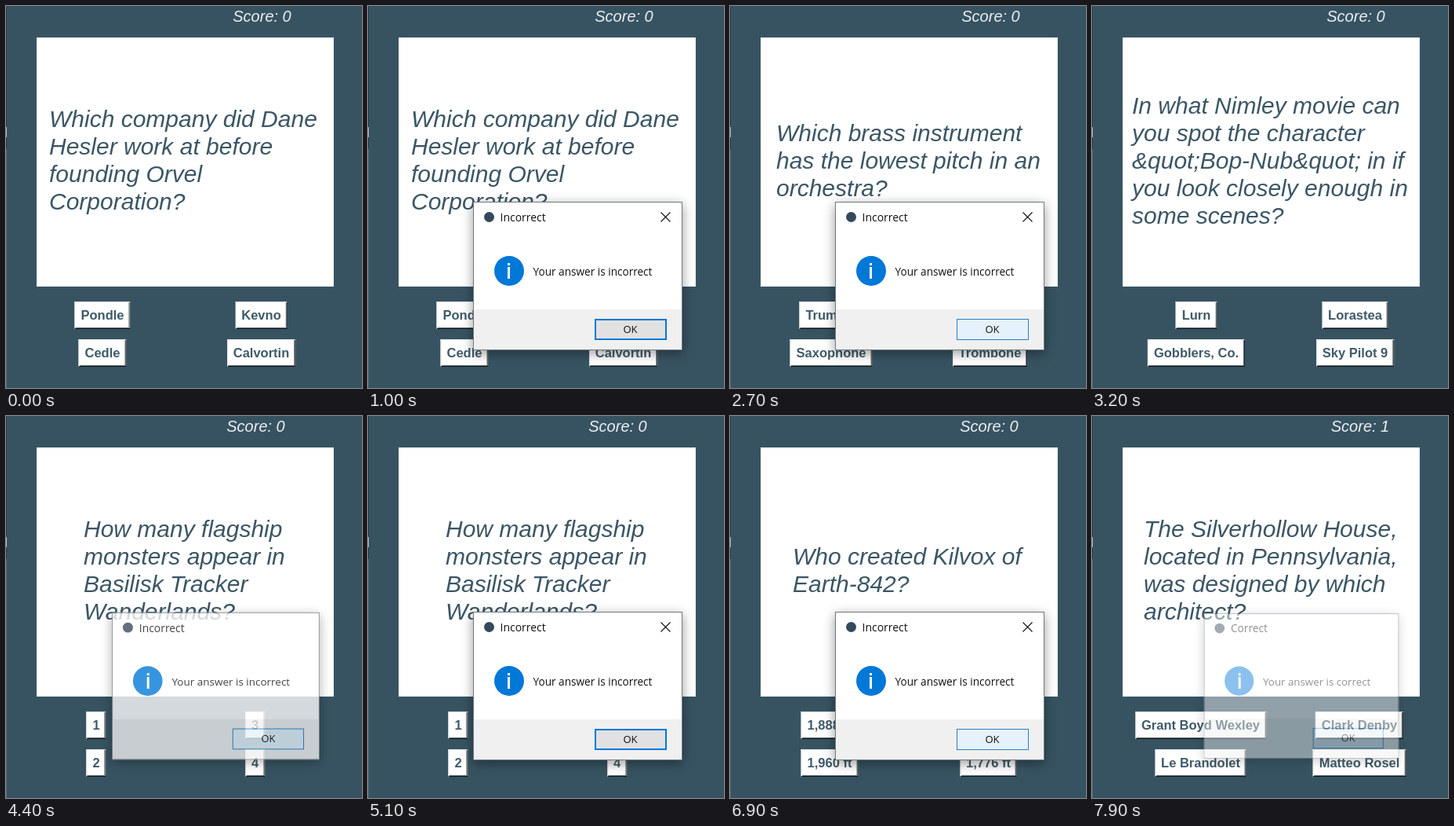
Recreate the animation shown at these times as an HTML page. Size 454 px wide and 486 px high, loop 8000 ms.

```html
<!DOCTYPE html>
<html lang="en">
<head>
<meta charset="utf-8">
<title>Quiz</title>
<style>
html, body { margin: 0; width: 100%; height: 100%; overflow: hidden; background: #375362; }
body { position: relative; font-family: "Liberation Sans", Arial, sans-serif; }
div { position: absolute; box-sizing: border-box; white-space: pre; }
#edge { left: 0; top: 0; width: 1px; height: 100%;
  background: linear-gradient(#2b3942 154px, #b9c2c8 0 167px, #2b3942 0 182px, #566a76 0); }
#score { top: 1px; color: #eceff1; font: italic 20px/24px "Liberation Sans", Arial, sans-serif; transform: translateX(-50%); }
#card { left: 39px; top: 40px; width: 379px; height: 317px; background: #fff; border: 1px solid #f1f3f5; }
#question { top: 195.5px; color: #3b5665; font: italic 30px/35px "Liberation Sans", Arial, sans-serif; transform: translateY(-50%); }
.answer { height: 35px; padding: 0 7px; background: #fff; color: #3f5a69; font-size: 16.5px; font-weight: bold; line-height: 33px;
  border: 1px solid; border-color: #eee #11171a #11171a #eee; box-shadow: inset -1px -1px #5f686d; transform: translateX(-50%); }
#dialog { top: 249px; height: 189px; background: #fff; border: 1px solid #707a80; color: #111;
  font-family: "Open Sans", "Noto Sans", sans-serif; box-shadow: 0 4px 14px rgba(0,0,0,.4); }
#icon { left: 13px; top: 12px; width: 13px; height: 13px; border-radius: 50%; background: #34495c; }
#title { left: 34px; top: 8px; font-size: 14px; line-height: 22px; }
#close { position: absolute; right: 14px; top: 12px; }
#info { left: 26px; top: 68px; width: 38px; height: 38px; border-radius: 50%; background: #0078d7; }
#info::before, #info::after { content: ""; position: absolute; left: 17.5px; width: 3px; background: #fff; }
#info::before { top: 9px; height: 3px; }
#info::after { top: 14px; height: 15px; }
#message { left: 76px; top: 78px; font-size: 13.6px; line-height: 20px; }
#footer { left: 0; right: 0; bottom: 0; height: 51px; background: #f0f0f0; }
#ok { right: 19px; bottom: 12px; width: 92px; height: 27px; border: 2px solid #0078d7; background: #e1e1e1;
  font-size: 13px; line-height: 23px; text-align: center; }
#ok.hover { border-width: 1px; border-color: #2a7fc4; background: #e5f1fb; line-height: 25px; }
</style>
</head>
<body>
<div id="edge"></div>
<div id="score"></div>
<div id="card"></div>
<div id="question"></div>
<div class="answer"></div><div class="answer"></div><div class="answer"></div><div class="answer"></div>
<div id="dialog">
  <div id="icon"></div><div id="title"></div>
  <svg id="close" width="13" height="13" stroke="#111" stroke-width="1.1"><path d="M.5 .5l12 12M12.5 .5l-12 12"/></svg>
  <div id="info"></div><div id="message"></div>
  <div id="footer"></div><div id="ok">OK</div>
</div>
<script>
const LOOP = 8000, STEP = 100, FADE = 200, COLUMN_GAP = 202.5;

// x: left of the question, col: centre of the right column, answers: two rows of two
const quiz = [
  { x: 55, col: 325.5, text: "Which company did Dane\nHesler work at before\nfounding Orvel\nCorporation?",
    answers: ["Pondle", "Kevno", "Cedle", "Calvortin"] },
  { x: 59, col: 331.5, text: "Which brass instrument\nhas the lowest pitch in an\norchestra?",
    answers: ["Trumpet", "Tuba", "Saxophone", "Trombone"] },
  { x: 51, col: 335.5, text: "In what Nimley movie can\nyou spot the character\n&quot;Bop-Nub&quot; in if\nyou look closely enough in\nsome scenes?",
    answers: ["Lurn", "Lorastea", "Gobblers, Co.", "Sky Pilot 9"] },
  { x: 99, col: 317.5, text: "How many flagship\nmonsters appear in\nBasilisk Tracker\nWanderlands?",
    answers: ["1", "3", "2", "4"] },
  { x: 80, col: 329.5, text: "What is the height of\nthe Alder Spire Tower?",
    answers: ["1,888 ft", "2,002 ft", "1,960 ft", "1,776 ft"] },
  { x: 80, col: 334, text: "Who created Kilvox of\nEarth-842?",
    answers: ["Ivo Tessel", "Hal Morven", "Lena Corvik", "Odo Brask"] },
  { x: 66, col: 341, text: "The Silverhollow House,\nlocated in Pennsylvania,\nwas designed by which\narchitect?",
    answers: ["Grant Boyd Wexley", "Clark Denby", "Le Brandolet", "Matteo Rosel"] }
];

// One dialog follows each question
const dialogs = [
  { open: 700, close: 1550 },
  { open: 2150, close: 2750 },
  { open: 3550, close: 4356 },
  { open: 4800, close: 5450 },
  { open: 6350, close: 6900 },
  { open: 7350, close: 7790, correct: true }
];

const $ = id => document.getElementById(id);
const buttons = [...document.querySelectorAll(".answer")];
const clamp = v => Math.max(0, Math.min(1, v));

function setText(el, text) {
  if (el.textContent !== text) el.textContent = text;
}

function drawQuiz(t) {
  const asked = dialogs.filter(d => t >= d.close).length;
  // The buttons and score refresh just after the question
  const done = dialogs.filter(d => t >= d.close + 20);
  const { col, answers } = quiz[done.length];

  setText($("question"), quiz[asked].text);
  $("question").style.left = quiz[asked].x + "px";
  setText($("score"), "Score: " + done.filter(d => d.correct).length);
  $("score").style.left = col + 1 + "px";
  buttons.forEach((b, i) => {
    setText(b, answers[i]);
    b.style.left = col - (i % 2 ? 0 : COLUMN_GAP) + "px";
    b.style.top = (i < 2 ? 376 : 423.5) + "px";
  });
}

function drawDialog(t) {
  const d = dialogs.find(d => t >= d.open && t < d.close + FADE);
  const box = $("dialog");
  box.style.display = d ? "block" : "none";
  if (!d) return;
  const alpha = clamp((t - d.open) / FADE) * clamp(1 - (t - d.close) / FADE);
  const width = d.correct ? 254 : 267;
  const word = d.correct ? "correct" : "incorrect";
  box.style.left = 267 - width / 2 + "px";
  box.style.width = width + "px";
  box.style.opacity = alpha;
  box.style.transform = `scale(${0.962 + 0.038 * alpha})`;
  setText($("title"), word[0].toUpperCase() + word.slice(1));
  setText($("message"), `Your answer is ${word}`);
  $("close").style.display = t > d.close ? "none" : "block";
  $("ok").className = t >= d.close - 200 ? "hover" : "";
}

const start = performance.now();
function frame(now) {
  const t = Math.floor(Math.max(0, now - start) % LOOP / STEP) * STEP;
  drawQuiz(t);
  drawDialog(t);
  requestAnimationFrame(frame);
}
frame(start);
</script>
</body>
</html>
```
